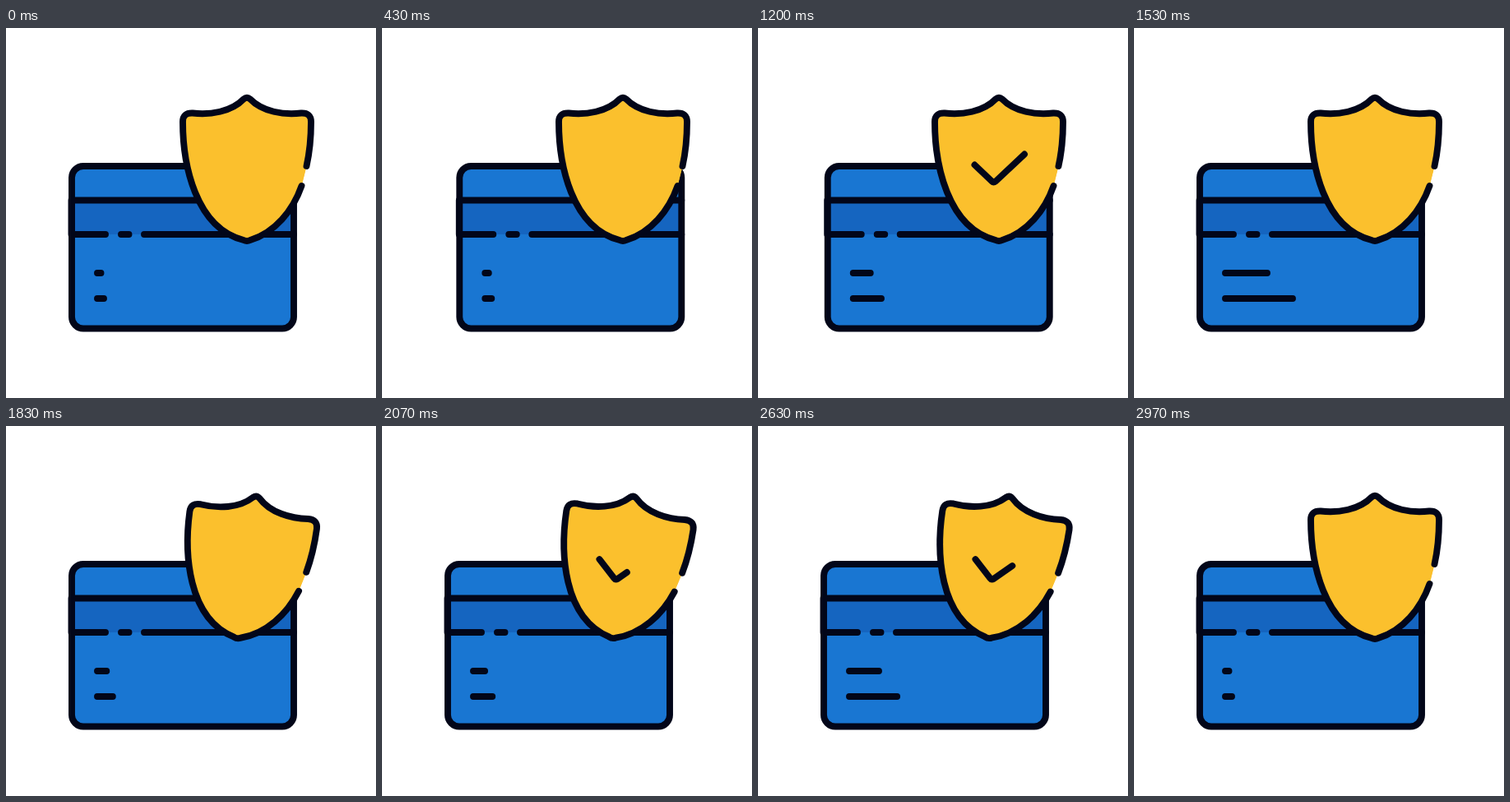
An HTML page for the animation above (3 s loop, 450x450 px).

```html
<!DOCTYPE html>
<html lang="en">
<head>
<meta charset="utf-8">
<title>Card protection</title>
<style>
html, body { margin: 0; width: 100%; height: 100%; overflow: hidden; background: #fff; }
svg { display: block; width: 100%; height: 100%; }
.ink { fill: none; stroke: #020619; stroke-width: 7.9; stroke-linecap: round; stroke-linejoin: round; }
</style>
</head>
<body>
<svg viewBox="0 0 450 450">
  <g id="card">
    <rect x="80" y="168" width="270" height="197.5" rx="14" fill="#1976d2"/>
    <path d="M80 209.5H350V251H80Z" fill="#1565c0"/>
    <rect class="ink" x="80" y="168" width="270" height="197.5" rx="14"/>
    <path class="ink" d="M350 209.5H79.5V251H121M140 251H149.5M168 251H350"/>
    <path class="ink" id="text"/>
  </g>
  <g id="shield">
    <!-- The outline starts and ends at the gap on the right; the fill closes it -->
    <path id="body" fill="#fbc02d" d="M359.5 192C349 222 327 249 297 258Q293 260 289 258C230 243 215 165 215 114Q215 103 227 103.5C248 106 274 102 289 86.5Q293 83 297 86.5C312 102 338 106 359 103.5Q371 103 371 114C371 133 369.5 150 365.5 168"/>
    <use href="#body"/>
    <path class="ink" id="outline"/>
    <path class="ink" id="check" pathLength="1" d="M263.500 166.500L284.500 186.500Q286.500 188.500 289 186.500L324 153.500"/>
  </g>
</svg>
<script>
const LOOP = 3000;
const [card, text, shield, body, outline, check] =
  ['card', 'text', 'shield', 'body', 'outline', 'check'].map(id => document.getElementById(id));
outline.setAttribute('d', body.getAttribute('d'));

// Smooth step from 0 to 1 between two times
function ease(t, from, to) {
  const p = Math.min(1, Math.max(0, (t - from) / (to - from)));
  return p * p * (3 - 2 * p);
}

// Rises from time a to b, holds, then falls from c to d
const pulse = (t, a, b, c, d) => ease(t, a, b) - ease(t, c, d);

function draw(t) {
  const slide = 18.5 * pulse(t, 120, 570, 920, 1340);
  const tilt = 8.5 * pulse(t, 1525, 1900, 2700, 2960);
  const tick = pulse(t, 800, 1080, 1200, 1500) + pulse(t, 1850, 2250, 2500, 2900);
  const write = pulse(t, 1000, 1500, 1535, 1925) + pulse(t, 1925, 2425, 2430, 2960);

  card.setAttribute('transform', `translate(${slide} 0)`);
  text.setAttribute('d', `M111 298h${4.5 + 46.5 * write}M111 329h${8 + 74 * write}`);
  shield.setAttribute('transform', `rotate(${tilt} 293 171)`);
  check.setAttribute('stroke-dasharray', `${tick} 2`);
  check.setAttribute('visibility', tick > 0.002 ? 'visible' : 'hidden');
}

const start = performance.now();
function frame() {
  draw((performance.now() - start) % LOOP);
  requestAnimationFrame(frame);
}
frame();
</script>
</body>
</html>
```
